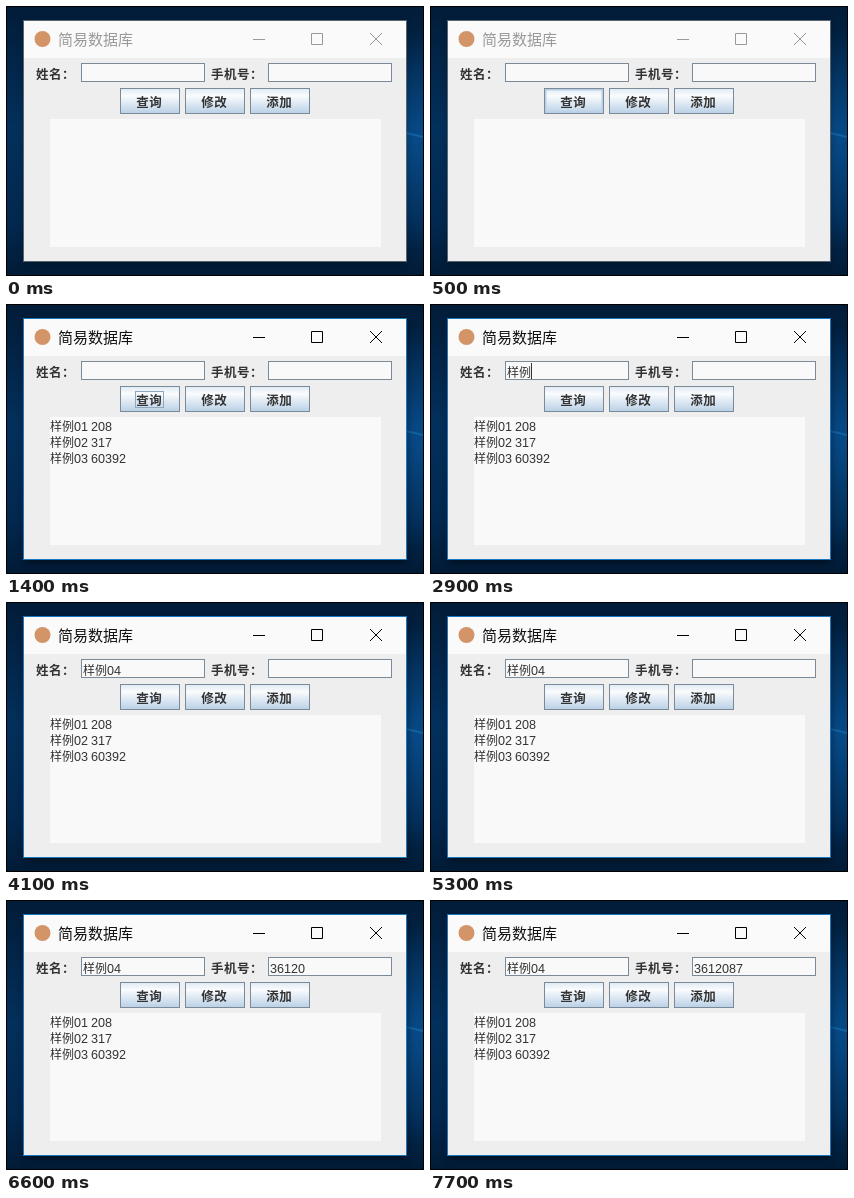
Recreate the animation shown at these times as an HTML page. Size 418x270 px, loop 8 s.

```html
<!DOCTYPE html>
<html lang="zh">
<head>
<meta charset="utf-8">
<style>
html, body { margin: 0; width: 100%; height: 100%; overflow: hidden; background: #000; }
svg { display: block; }
text { font: 12px "Noto Sans CJK SC", "Noto Sans CJK", sans-serif; fill: #333; white-space: pre; }
.num { font: 12.6px "Liberation Sans", Arial, sans-serif; word-spacing: -.5px; }
.bold { font-weight: 700; font-size: 12.5px; letter-spacing: .5px; }
#title { font-size: 15px; }
.line { fill: none; stroke: #7a8a99; }
.light { fill: none; stroke: #f9f9f9; }
</style>
</head>
<body>
<svg width="418" height="270" viewBox="0 0 418 270">
  <defs>
    <linearGradient id="desk" x2="0" y2="1">
      <stop stop-color="#021c38"/><stop offset=".45" stop-color="#03305c"/>
      <stop offset=".8" stop-color="#02284f"/><stop offset="1" stop-color="#021b36"/>
    </linearGradient>
    <radialGradient id="glow" gradientUnits="userSpaceOnUse" cx="410" cy="134" r="110">
      <stop stop-color="#0a5ca5" stop-opacity=".6"/><stop offset="1" stop-color="#0a5ca5" stop-opacity="0"/>
    </radialGradient>
    <linearGradient id="steel" x2="0" y2="1">
      <stop stop-color="#dde8f3"/><stop offset=".3" stop-color="#fafcfd"/>
      <stop offset=".6" stop-color="#dde8f3"/><stop offset="1" stop-color="#b8cfe5"/>
    </linearGradient>
    <filter id="blur"><feGaussianBlur stdDeviation="4"/></filter>
  </defs>
  <rect width="418" height="270" fill="url(#desk)"/>
  <rect width="418" height="270" fill="url(#glow)"/>
  <path d="M400 127L417 131" stroke="#1b72b8" stroke-width="2" opacity=".6"/>
  <rect x=".5" y=".5" width="417" height="269" fill="none" stroke="#000"/>
  <rect id="shadow" x="19" y="18" width="381" height="240" filter="url(#blur)"/>

  <rect x="18" y="14" width="382" height="241" fill="#eee"/>
  <rect x="18" y="14" width="382" height="38" fill="#fafafa"/>
  <rect id="frame" x="17.5" y="14.5" width="383" height="241" fill="none"/>
  <circle cx="36.5" cy="33" r="8" fill="#d39468"/>
  <text id="title" x="52" y="38.8">简易数据库</text>
  <path id="controls" d="M247 33.5h12M305.5 27.5h11v11h-11zM364 27l12 12M376 27l-12 12" fill="none"/>

  <text class="bold" x="30" y="72.5">姓名：</text>
  <text class="bold" x="205" y="72.5">手机号：</text>
  <g id="parts"></g>
  <rect x="44" y="113" width="331" height="128" fill="#f9f9f9"/>
  <g id="rows"></g>
  <text id="name" x="77" y="72.5"></text>
  <text id="phone" class="num" x="264" y="72.5"></text>
  <rect id="caret" y="59" width="1" height="16" fill="#333"/>
</svg>
<script>
const $ = id => document.getElementById(id);
const set = (el, attrs) => { for (const k in attrs) el.setAttribute(k, attrs[k]); };
const NAME = '样例04', PHONE = '3612087', FIELD_W = 124;

const person = (name, rest = '') =>
  `${name.slice(0, 2)}<tspan class="num">${name.slice(2)}${rest}</tspan>`;

const field = x => `<rect x="${x}" y="57" width="${FIELD_W}" height="19" fill="#f9f9f9"/>
  <rect class="light" x="${x + 1.5}" y="58.5" width="${FIELD_W - 2}" height="17"/>
  <rect class="line" x="${x + .5}" y="57.5" width="${FIELD_W - 1}" height="18"/>`;

const button = (label, i) => `<g transform="translate(${114 + 65 * i} 82)">
  <rect id="face${i}" width="60" height="26"/>
  <rect id="hover${i}" x="1.5" y="1.5" width="57" height="23" fill="none" stroke="#b8cfe5" stroke-width="2"/>
  <path id="press${i}" class="line" d="M1.5 25V1.5H59"/>
  <rect class="line" x=".5" y=".5" width="59" height="25"/>
  <rect id="focus${i}" x="15.5" y="5.5" width="28" height="16" fill="none" stroke="#8ea6be"/>
  <text class="bold" x="16.3" y="18.5">${label}</text></g>`;

$('parts').innerHTML = field(75) + field(262) + ['查询', '修改', '添加'].map(button).join('');
$('rows').innerHTML = ['208', '317', '60392'].map((n, i) =>
  `<text x="44" y="${126.5 + 16 * i}">${person('样例0' + (i + 1), ' ' + n)}</text>`).join('');

// time, characters in the name, characters in the phone, field with a visible caret
const steps = [
  [0, 0, 0, 0], [2100, 0, 0, 1], [2500, 0, 0, 0], [2900, 2, 0, 1], [3400, 3, 0, 1],
  [3700, 4, 0, 1], [4100, 4, 0, 0], [4600, 4, 0, 1], [4800, 4, 0, 2], [5300, 4, 0, 0],
  [5500, 4, 2, 2], [5600, 4, 3, 2], [5900, 4, 4, 2], [6200, 4, 5, 2], [6600, 4, 5, 0],
  [7100, 4, 6, 2], [7200, 4, 7, 2], [7700, 4, 7, 0]
];
const nameWidth = n => 12 * Math.min(n, 2) + 7 * Math.max(n - 2, 0);

function draw(t) {
  const active = t >= 700, pressed = active && t < 1400;
  const hovered = t < 400 || active ? -1 : t < 500 ? 1 : 0;
  const show = (id, on) => set($(id), { visibility: on ? 'visible' : 'hidden' });

  set($('shadow'), { opacity: active ? .6 : .3 });
  set($('frame'), { stroke: active ? '#1878bd' : '#59656f' });
  set($('controls'), { stroke: active ? '#000' : '#999' });
  $('title').style.fill = active ? '#111' : '#999';
  for (let i = 0; i < 3; i++) {
    const down = pressed && i === 0;
    set($('face' + i), { fill: down ? '#b8cfe5' : 'url(#steel)' });
    show('press' + i, down);
    show('hover' + i, i === hovered);
    show('focus' + i, i === 0 && active && t < 2100);
  }
  show('rows', t >= 1400);

  const [, n, p, owner] = steps.findLast(s => s[0] <= t);
  $('name').innerHTML = person(NAME.slice(0, n));
  $('phone').textContent = PHONE.slice(0, p);
  show('caret', owner);
  set($('caret'), { x: owner === 2 ? 264 + 7 * p : 77 + nameWidth(n) });
}

function tick() {
  draw(performance.now() % 8000);
  requestAnimationFrame(tick);
}
tick();
</script>
</body>
</html>
```
